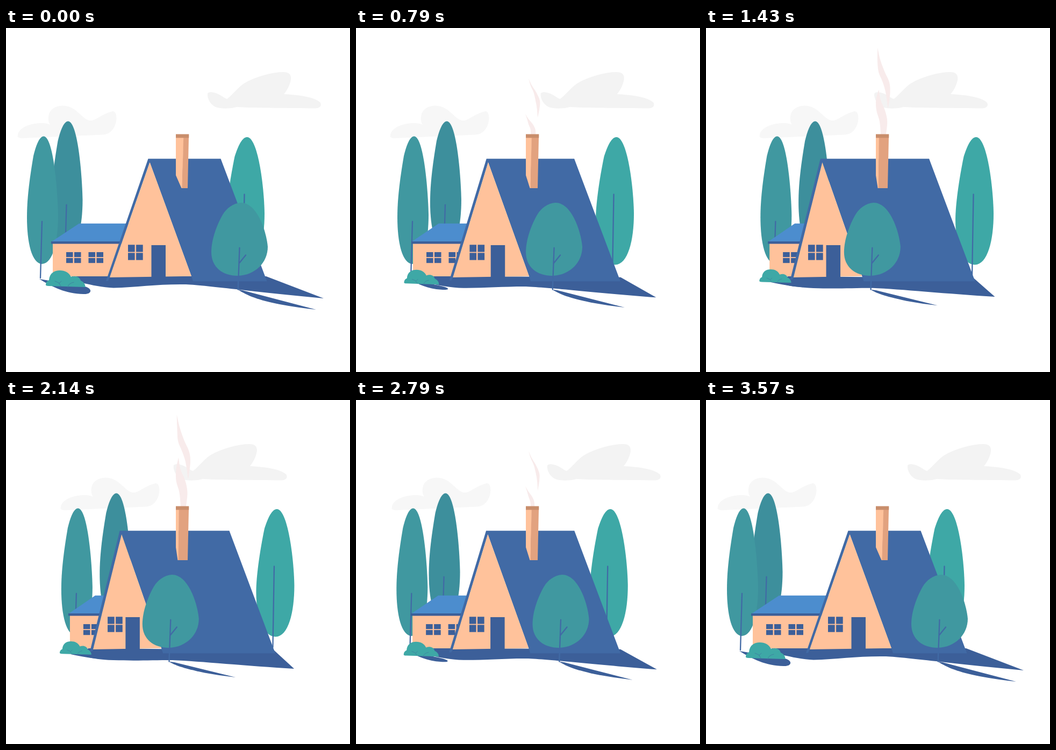
Animation of 640 by 640 pixels, one loop 4210 ms. Source, as an HTML page with a canvas:

```html
<!DOCTYPE html>
<html lang="en">
<head>
<meta charset="utf-8">
<title>House</title>
<style>
  html, body { margin: 0; width: 100%; height: 100%; overflow: hidden; background: #fff; }
  canvas { display: block; width: 640px; height: 640px; }
</style>
</head>
<body>
<canvas id="stage" width="640" height="640"></canvas>
<script>
const ctx = document.getElementById('stage').getContext('2d');
const LOOP = 4210, STEP = 71.4;
const BLUE = '#416aa5', DARK = '#3c5f99', PEACH = '#ffc29b';
const TEAL = '#4098a0', MINT = '#3ea8a6';

// Bezier easing: x handles of the way out, then of the way back
const EASE = {
  left: [.547, .205, .67, .326],
  house: [.71, .187, .686, .196],
  right: [.453, .215, .783, .128],
  front: [.635, .195, .6, .26],
  cloudL: [.625, .196, .67, .32],
  cloudR: [.65, .194, .49, .216]
};

function ease(x, a, b) {
  if (x <= 0) return 0;
  if (x >= 1) return 1;
  let lo = 0, hi = 1;
  for (let i = 0; i < 30; i++) {
    const s = (lo + hi) / 2, r = 1 - s;
    if (3 * a * s * r * r + 3 * b * s * s * r + s * s * s < x) lo = s; else hi = s;
  }
  return lo * lo * (3 - 2 * lo);
}

function progress(name, k) {
  const [a, b, c, d] = EASE[name];
  return k < 29 ? ease(k / 25, a, b) : 1 - ease((k - 29) / 21, c, d);
}

const mix = (a, b, p) => a + (b - a) * p;

// Blend two path strings that have the same commands
function morph(from, to, p) {
  const ends = to.match(/[\d.]+/g);
  let i = 0;
  return from.replace(/[\d.]+/g, n => mix(+n, +ends[i++], p).toFixed(2));
}

function fill(color, d, dx = 0, dy = 0) {
  ctx.save();
  ctx.translate(dx, dy);
  ctx.fillStyle = color;
  ctx.fill(new Path2D(d));
  ctx.restore();
}

function line(color, d, dx = 0, dy = 0, width = 2.3) {
  ctx.save();
  ctx.translate(dx, dy);
  ctx.strokeStyle = color;
  ctx.lineWidth = width;
  ctx.lineCap = 'round';
  ctx.stroke(new Path2D(d));
  ctx.restore();
}

function panes(x, y, w, h) {
  ctx.fillStyle = DARK;
  for (const px of [x, x + w + 2.5])
    for (const py of [y, y + h + 1.8]) ctx.fillRect(px, py, w, h);
}

// Smoke poses: rows of centre x, y, half width
const UPPER = [
  [[321, 98, 0], [326, 112, 0], [332, 126, 0], [337, 142, 0], [339, 158, 0], [339, 177, 0]],
  [[321, 94, 0], [326, 107, 1.2], [333, 120, 2.5], [338, 135, 4], [339, 149, 2.5], [338, 167, 0]],
  [[324, 66, 0], [323.5, 82, 3.2], [329, 97, 5], [336, 113, 5], [338, 132, 3.5], [338, 158, 0]],
  [[317.5, 26, 0], [321, 52, 2.6], [326, 76, 6], [334, 95, 6.5], [338.5, 115, 4.5], [339, 148, 0]]
];
const LOWER = [
  [[314, 160, 0], [317, 170, 0], [320, 180, 0], [322, 189, 0], [324, 198, 0]],
  [[315, 160, 0], [320, 170, 1.5], [325, 179, 4], [329, 188, 4.5], [330, 198, 4.5]],
  [[323, 138, 0], [321, 151, 5.5], [326, 165, 6.5], [330.5, 180, 6], [330, 198, 4.5]],
  [[321, 106, 0], [320.5, 128, 4], [325, 150, 8.5], [330, 172, 7.5], [330, 198, 5]]
];

function spline(pts) {
  ctx.lineTo(...pts[0]);
  for (let i = 0; i < pts.length - 1; i++) {
    const a = pts[i], b = pts[i + 1], o = pts[i - 1] || a, n = pts[i + 2] || b;
    ctx.bezierCurveTo(a[0] + (b[0] - o[0]) / 6, a[1] + (b[1] - o[1]) / 6,
      b[0] - (n[0] - a[0]) / 6, b[1] - (n[1] - a[1]) / 6, b[0], b[1]);
  }
}

function wisp(poses, pos) {
  const i = Math.min(2, Math.floor(pos));
  const rows = poses[i].map((row, r) => row.map((v, c) => mix(v, poses[i + 1][r][c], pos - i)));
  ctx.beginPath();
  spline(rows.map(([x, y, w]) => [x - w, y]));
  spline(rows.map(([x, y, w]) => [x + w, y]).reverse());
  ctx.fillStyle = '#f8ebeb';
  ctx.fill();
}

function smoke(p) {
  if (p <= 0) return;
  const at = [0, .516, .797, .976, 1], pose = [0, 1, 2, 2.74, 3];
  let i = 0;
  while (i < 3 && p > at[i + 1]) i++;
  const pos = mix(pose[i], pose[i + 1], (p - at[i]) / (at[i + 1] - at[i]));
  wisp(UPPER, pos);
  wisp(LOWER, pos);
}

const CLOUD_L = 'M22 199C24 184 48 177 66 177C74 177 78 178 82 180C76 170 76 146 105 144.5' +
  'C130 145 138 165 152 171C164 177 176 160 198 155Q205 154 205.5 168C205 182 197 198 180 198.5L30 205Q20 205 22 199Z';
const CLOUD_R = 'M375 122Q378 118 386 120C398 122 404 130 411 132C420 126 430 112 443 103' +
  'C465 90 495 82 516 82C528 82 531 88 530 96C528 106 524 115 517 123C540 124 575 128 585 139' +
  'C588 146 583 149 575 149.5C530 149 470 149 429 147C420 150 400 151 390 147C381 143 374 132 375 122Z';
const SLIM = 'M70 201.5C61 202 55 222 51 238C43 285 39 320 39 352C39 400 48 438 67 439' +
  'C88 438 97 395 97 348C96 300 88 202 70 201.5Z';
const TALL = 'M448.5 203C438 203 430 225 425.5 239C416 285 410 330 410 357C410 405 424 440 446 440.5' +
  'C470 440 481 395 481 345C480 290 468 203 448.5 203Z';
const ROUND = 'M437 325C422 326 410 336 404 346C392 366 382 394 382 417C382 445 403 461 431 461' +
  'C464 460 487 436 487 407C484 375 466 325 437 325Z';
const BUSH = 'M74 477C75 471 78 470 80 469C81 456 90 451 100 451C110 451 117 455 121 463' +
  'C128 460 137 462 139 470C144 472 148 477 147.5 482L80 480Q73 480 74 477Z';

function shadows(l, f) {
  fill(DARK, morph(
    'M62 467C85 481 112 495 144 495C160 496 162 485 147 481Z',
    'M126 467C135 474 150 479 168 481C188 483 188 482 150 476Z', l));
  fill(DARK, morph(
    'M120 461L140 474C160 478 180 483 200 483.5C245 482 285 476 335 477C375 479 480 493 591 503L484 462Z',
    'M154 462L120 473C150 479 175 483.5 200 484C240 485.5 270 484 310 484C360 486 450 495 536 500L498 465Z', l));
  fill(DARK, morph(
    'M431 486.5C449 498 469 506 509 514Q541 520 577 524L440 488Z',
    'M303 486.5C313 493 325 498 369 507.5Q398 513 427 516L313 488Z', f));
}

function wing(l, h) {
  const end = mix(230, 195, h), dx = 32 * l;
  fill(PEACH, `M${87 + dx} 400H${end}V462H${87 + dx}Z`);
  fill('#4c8dce', `M${84 + dx} 398L${136 + 30 * l} 363.7H${end}V398Z`);
  fill(DARK, `M${84 + dx} 397H${end}V401.5H${84 + dx}Z`);
  panes(112 + dx, 417, 12.5, 9.2);
  panes(153.5 + dx, 417, 12.5, 9.2);
}

function house(h) {
  fill(BLUE, morph(
    'M264.5 243.3L186 470.5L190 470.5L193 464L267.5 250L345 462L348 471.3L485.5 471.3L399.5 243.3Z',
    'M211.5 243.3L156 468L160 468L163 464L215 250L289 462L292 471.3L501 471.3L415.5 243.3Z', h));
  fill(PEACH, morph('M267.5 250L193 464L345 461.8Z', 'M215 250L162 464L289 461.8Z', h));
  panes(227 - 38 * h, 403.3, 12.6, 13.3);
  fill(DARK, 'M270.5 404H297V464H270.5Z', -48.2 * h);
  fill(PEACH, morph('M316 203L330.5 203L328 298L326.5 298L316 274Z',
    'M316 203L322 203L321 298L319.5 298L316 274Z', h));
  fill('#e2a27f', morph('M330.2 203L340 203L338 298L327.5 298Z',
    'M321.7 203L340 203L338 298L320.5 298Z', h));
  fill('#c98e6c', 'M316 197.5H340.3V204.4H316Z');
}

function bush(l) {
  const s = mix(1, .8, l);
  ctx.save();
  ctx.translate(mix(74, 100, l), mix(451, 449, l));
  ctx.scale(s, s);
  fill(MINT, BUSH, -74, -451);
  line('#3f83a0', 'M91 471L98 474L102 480M103 471L99 475M115 482Q116 475 126 473', -74, -451, 1);
  ctx.restore();
}

function draw(k) {
  const [l, h, r, f, cl, cr] = Object.keys(EASE).map(name => progress(name, k));
  ctx.fillStyle = '#fff';
  ctx.fillRect(0, 0, 640, 640);

  fill('#f7f7f7', CLOUD_L, 80 * cl);
  fill('#f3f3f3', CLOUD_R, -63.5 * cr);
  smoke(f);

  fill('#3d8f9c', SLIM, 45.5 + 90 * l, -28);
  line(BLUE, 'M67 357L65.5 412', 45.5 + 90 * l, -28);
  fill(TEAL, SLIM, 64 * l);
  line(BLUE, 'M67 360L64 465', 64 * l);
  fill(MINT, TALL, 55.5 * r);
  line(BLUE, 'M443.5 309.5L441 460', 55.5 * r);

  shadows(l, f);
  wing(l, h);
  house(h);
  bush(l);
  fill(TEAL, ROUND, -128.5 * f);
  line(BLUE, 'M434.5 409L431.7 486.5M433.5 438L446 422.5', -128.5 * f);
}

// The motion runs in 59 even steps per loop
function tick() {
  draw(Math.floor((performance.now() % LOOP + 8) / STEP));
  requestAnimationFrame(tick);
}
tick();
</script>
</body>
</html>
```
